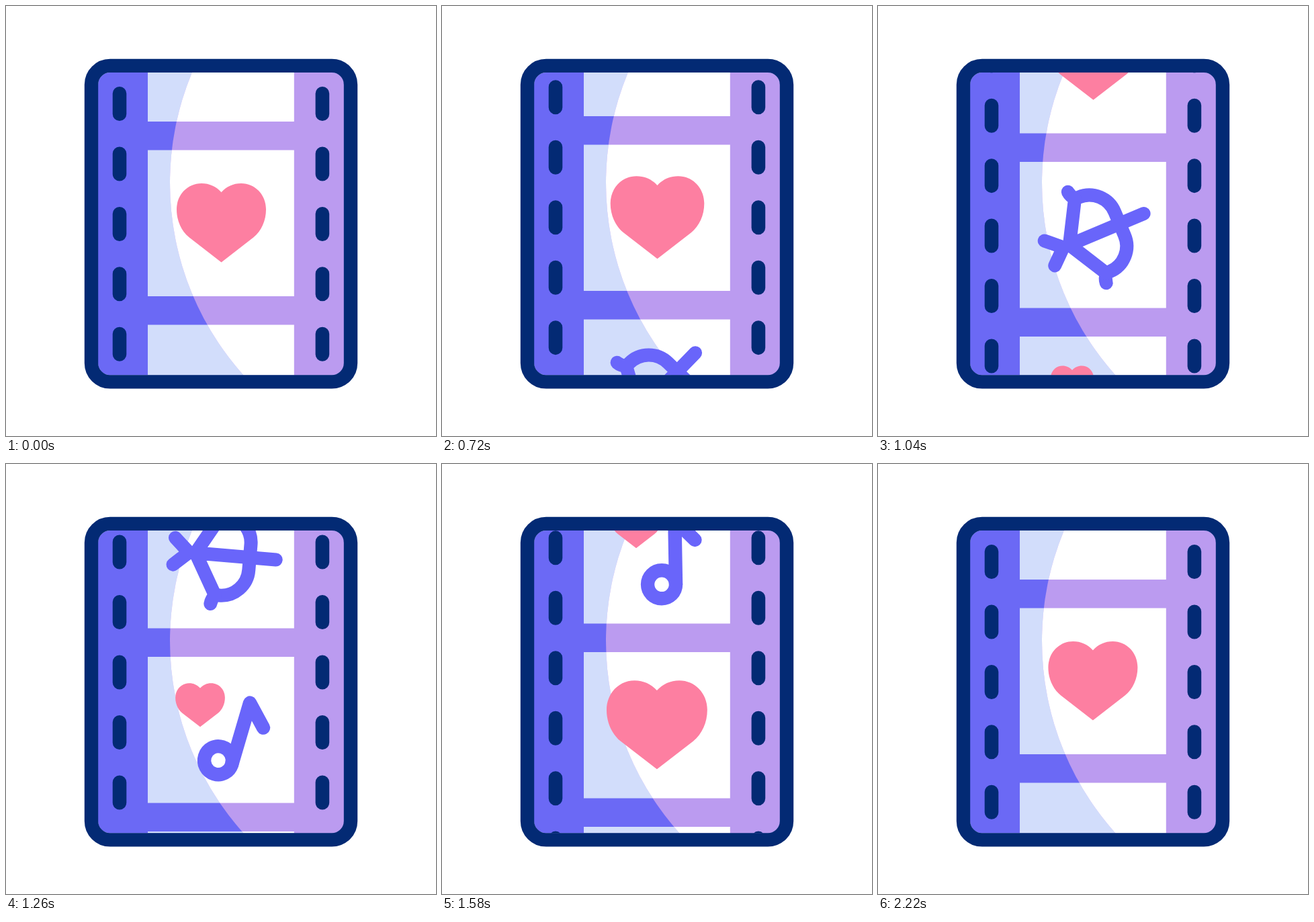
These frames come from a looping animation (640x640 px, 2.4 s). An HTML page:

```html
<!DOCTYPE html>
<html lang="en">
<head>
<meta charset="utf-8">
<title>Film strip</title>
<style>
  html, body { margin: 0; width: 100%; height: 100%; overflow: hidden; background: #fff; }
  svg { display: block; width: 100vw; height: 100vh; }
</style>
</head>
<body>
<svg viewBox="0 0 640 640">
  <defs>
    <clipPath id="inside"><rect x="137" y="99" width="366" height="450.4" rx="18"/></clipPath>
    <clipPath id="lit"><circle cx="672" cy="263.5" r="428"/></clipPath>
    <path id="heart" fill="#fd7fa1" d="M0-45.5C-7.5-54-18-58.7-29.5-58.7C-50-58.7-66.5-42-66.5-20C-66.5-3-59.5 12-48 21.5L0 58.6L48 21.5C59.5 12 66.5-3 66.5-20C66.5-42 50-58.7 29.5-58.7C18-58.7 7.5-54 0-45.5Z"/>
    <path id="windows"/>
  </defs>
  <g clip-path="url(#inside)">
    <rect x="130" y="90" width="380" height="470" fill="#6b69f5"/>
    <use href="#windows" fill="#d2ddfb"/>
    <g clip-path="url(#lit)">
      <rect x="130" y="90" width="380" height="470" fill="#bb9bf0"/>
      <use href="#windows" fill="#fff"/>
    </g>
    <path id="holes" stroke="#032a74" stroke-width="20.6" stroke-linecap="round"/>
    <use id="firstHeart" href="#heart"/>
    <g id="bow" fill="none" stroke="#6965fa" stroke-width="20" stroke-linecap="round" stroke-linejoin="round">
      <path d="M-9.5-73.5Q-9-66-3-60H2A41 41 0 0 1 43-18.5V18.5A41 41 0 0 1 2 60H-3Q-9 66-9.5 73.5"/>
      <path d="M-4-60L-38 0L-4 60M-70-20L-48 0L-70 20M-48 0H82"/>
    </g>
    <use id="smallHeart" href="#heart"/>
    <g id="note" fill="none" stroke="#6965fa" stroke-width="20.4" stroke-linecap="round" stroke-linejoin="round">
      <circle cx="-11.3" cy="38.7" r="21"/>
      <path d="M9.7 38.7L8.1-57L38.2-27.6"/>
    </g>
    <use id="lastHeart" href="#heart"/>
  </g>
  <rect x="127" y="88.9" width="386" height="470.5" rx="28" fill="none" stroke="#032a74" stroke-width="20.4"/>
</svg>
<script>
  const LOOP = 2400, PITCH = 260, HOLE_PITCH = 89.45, SWING = 51;
  const el = id => document.getElementById(id);

  // Smooth step from 0 to 1 between two times.
  const ease = (t, from, to) => {
    const s = Math.min(1, Math.max(0, (t - from) / (to - from)));
    return s * s * (3 - 2 * s);
  };
  const pulse = (t, start, peak, end) => ease(t, start, peak) - ease(t, peak, end);

  // Pull back, run past the goal, settle.
  const travel = (t, distance) =>
    -SWING * ease(t, 200, 500) +
    (distance + 2 * SWING) * ease(t, 500, 1900) -
    SWING * ease(t, 1900, 2200);

  const place = (id, x, y, extra = "") =>
    el(id).setAttribute("transform", `translate(${x} ${y}) ${extra}`);
  const show = (id, visible) => el(id).setAttribute("visibility", visible ? "visible" : "hidden");

  el("windows").setAttribute("d",
    [-2, -1, 0, 1, 2, 3, 4, 5].map(i => `M211 ${214.4 + i * PITCH}h217.8v217.5h-217.8z`).join(""));
  el("holes").setAttribute("d",
    Array.from({ length: 18 }, (_, i) => {
      const y = 130.3 + (i - 2) * HOLE_PITCH;
      return `M169 ${y}v30.4M470.9 ${y}v30.4`;
    }).join(""));

  function draw(t) {
    const scroll = travel(t, 3 * PITCH);
    const middle = i => 323.1 + i * PITCH - scroll;

    place("windows", 0, -scroll);
    place("holes", 0, -travel(t, 9 * HOLE_PITCH));

    place("firstHeart", 320.5, middle(0) - 0.3, `scale(${1 + 0.05 * pulse(t, 200, 700, 1200)})`);
    place("bow", 320, middle(1), `rotate(${-46 + 86 * ease(t, 700, 1700)})`);
    place("smallHeart", 289, middle(2) - 36.8,
      `scale(${0.474 * (1 + 0.25 * pulse(t, 950, 1450, 1950))})`);
    place("note", 338.3, middle(2) + 12, `rotate(${18 - 31.9 * ease(t, 1200, 1900)})`);
    place("lastHeart", 319.9, middle(3) - 0.3, `scale(${1 + 0.148 * pulse(t, 1200, 1700, 2200)})`);

    show("bow", t >= 500);
    show("note", t < 1900);
    show("smallHeart", t < 1900);
  }

  function tick() {
    draw(performance.now() % LOOP);
    requestAnimationFrame(tick);
  }
  tick();
</script>
</body>
</html>
```
